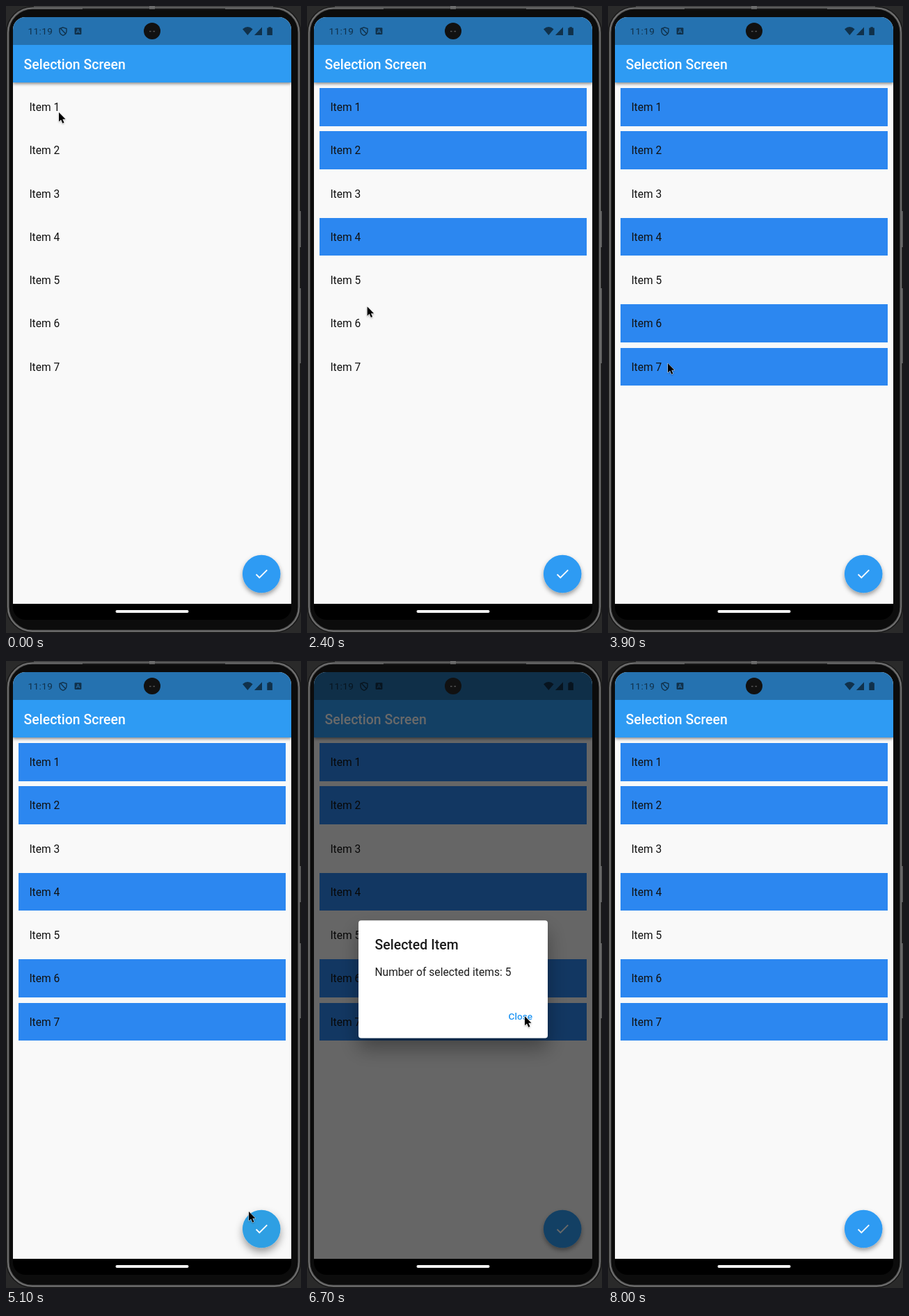
Animation, 424 px wide and 902 px high, one loop 8.1 s. Source, as an HTML page:

```html
<!DOCTYPE html>
<html lang="en">
<head>
<meta charset="utf-8">
<title>Selection Screen</title>
<style>
  html, body { margin: 0; width: 100%; height: 100%; overflow: hidden; background: #202020; }
  svg { display: block; width: 424px; height: 902px; font-family: Roboto, "Noto Sans", sans-serif; }
  .title { font-size: 19.46px; font-weight: 500; }
  .body { font-size: 15.57px; }
</style>
</head>
<body>
<svg viewBox="0 0 424 902" xmlns="http://www.w3.org/2000/svg">
  <defs>
    <clipPath id="screenClip"><rect x="10" y="16" width="400" height="867" rx="18"/></clipPath>
    <filter id="barShadow" x="-5%" y="-20%" width="110%" height="160%">
      <feDropShadow dx="0" dy="2" stdDeviation="2" flood-opacity=".45"/>
    </filter>
    <filter id="fabShadow" x="-50%" y="-50%" width="200%" height="200%">
      <feDropShadow dx="0" dy="3.5" stdDeviation="3.2" flood-opacity=".38"/>
    </filter>
    <filter id="fabLift" x="-50%" y="-50%" width="200%" height="220%">
      <feDropShadow dx="0" dy="6" stdDeviation="6" flood-opacity=".38"/>
    </filter>
    <filter id="dialogShadow" x="-30%" y="-30%" width="160%" height="180%">
      <feDropShadow dx="0" dy="15" stdDeviation="14" flood-opacity=".34"/>
    </filter>
    <filter id="cursorShadow" x="-50%" y="-50%" width="200%" height="200%">
      <feDropShadow dx="0" dy="1.2" stdDeviation="1" flood-opacity=".35"/>
    </filter>
  </defs>

  <!-- phone body -->
  <rect width="424" height="902" fill="#2a2a2a"/>
  <rect x=".8" y="1.2" width="422.4" height="900" rx="37" fill="#0c0c0c" stroke="#161616" stroke-width="1.4"/>
  <rect x="3" y="3.2" width="418" height="896" rx="35" fill="none" stroke="#505050" stroke-width="3.2"/>
  <rect x="2.8" y="3" width="418.4" height="896.4" rx="35" fill="none" stroke="#7c7c7c" stroke-width="1.1"/>
  <path d="M40 1H384" stroke="#6a6a6a" stroke-width="1.2"/>
  <path d="M110 4.4H206M214 4.4H315" stroke="#161616" stroke-width="2"/>
  <rect x="206" y="0" width="8" height="4" fill="#6c6c6c"/>
  <path d="M423 295V347M423 406V514" stroke="#6a6a6a" stroke-width="1.6"/>

  <g clip-path="url(#screenClip)">
    <rect x="10" y="16" width="400" height="844" fill="#f9f9f9"/>
    <g id="tiles"></g>
    <rect x="10" y="56" width="400" height="54" fill="#2f9bf3" filter="url(#barShadow)"/>
    <rect x="10" y="16" width="400" height="40" fill="#2572b0"/>
    <text class="title" x="25.6" y="90.6" fill="#fff">Selection Screen</text>

    <!-- status icons -->
    <g fill="#10314b">
      <text x="31.6" y="41.2" font-size="13.6" letter-spacing=".35">11:19</text>
      <path d="M82 30.8L87 32.6V36C87 39 85 41.3 82 42.3C79 41.3 77 39 77 36V32.6ZM78.8 32.8L86 40.3" fill="none" stroke="#10314b" stroke-width="1.4"/>
      <rect x="98.6" y="31.2" width="9.8" height="9.8" rx="1"/>
      <path d="M101 39L103.5 33L106 39M102 37.2H105" fill="none" stroke="#2572b0"/>
      <path d="M340 33.2Q347.3 27 354.6 33.2L347.3 42Z"/>
      <path d="M368 30.5V42H357Z" opacity=".35"/>
      <path d="M364.5 34.2V42H357Z M368 30.5V42H357Z"/>
      <path d="M375.3 31.6H377.3V30.2H380.9V31.6H382.9V42H375.3Z"/>
    </g>

    <g id="fab">
      <circle id="fabDisc" cx="367.2" cy="817" r="27.3"/>
      <path transform="translate(355.5 805.3) scale(.973)" fill="#fff" d="M9 16.17L4.83 12l-1.42 1.41L9 19 21 7l-1.41-1.41z"/>
    </g>

    <rect id="scrim" x="10" y="16" width="400" height="844"/>
    <rect x="10" y="860" width="400" height="23" fill="#000"/>
    <rect x="157.5" y="869" width="105" height="4" rx="2" fill="#f4f4f4"/>

    <g id="dialog">
      <rect x="74" y="373.3" width="272" height="169.2" rx="4" fill="#fff" filter="url(#dialogShadow)"/>
      <rect id="closeInk" x="281.5" y="493.5" width="56.5" height="36" rx="10" fill="#3fb4ee"/>
      <g fill="#1c1c1c">
        <text class="title" x="97.4" y="415.2" letter-spacing=".04">Selected Item</text>
        <text class="body" x="97.4" y="453.4" letter-spacing=".03">Number of selected items: 5</text>
      </g>
      <text x="289.6" y="516.2" font-size="13.62" font-weight="500" fill="#2196f3">Close</text>
    </g>
  </g>

  <circle cx="210" cy="36" r="12" fill="#111"/>
  <path d="M206 36.5h2.6M211.4 36.5h2.6" stroke="#555" stroke-width="1.3"/>

  <g id="cursor">
    <path transform="translate(0 1) scale(.9)" d="M0 0V14.8L3.4 11.6L5.9 17.4L8.3 16.3L5.9 10.8H10.6Z" fill="#000" stroke="#fff" paint-order="stroke" stroke-linejoin="round" filter="url(#cursorShadow)"/>
  </g>
</svg>

<script>
const LOOP = 8100, STEP = 100;
const TILE = { x: 18, top: 118, width: 384, height: 54.7, pitch: 62.25 };
const $ = id => document.getElementById(id);

// Press time of each item that gets selected, and where it is touched.
const taps = {
  1: { at: 300, x: 76 }, 2: { at: 1300, x: 83 }, 4: { at: 1900, x: 90 },
  6: { at: 2600, x: 86 }, 7: { at: 3400, x: 86 }
};

// Pointer stops: time, x, y.
const pointer = [
  [0, 76, 152], [600, 76, 152], [1000, 83, 213], [1400, 83, 213],
  [1600, 90, 331], [2100, 90, 331], [2500, 86, 450], [3000, 86, 450],
  [3300, 86, 513], [3900, 86, 513], [4800, 349, 791], [5600, 349, 791],
  [6500, 313, 510], [LOOP, 313, 510]
];

const clamp = v => Math.max(0, Math.min(1, v));
const progress = (t, from, to) => clamp((t - from) / (to - from));
const smooth = u => u * u * (3 - 2 * u);

function add(parent, name, attrs) {
  const el = document.createElementNS("http://www.w3.org/2000/svg", name);
  for (const key in attrs) el.setAttribute(key, attrs[key]);
  return parent.appendChild(el);
}

const tiles = Array.from({ length: 7 }, (_, i) => {
  const top = TILE.top + i * TILE.pitch;
  const y = Math.round(top);
  const box = { x: TILE.x, y, width: TILE.width, height: Math.round(top + TILE.height) - y };
  const id = "tileClip" + i;
  add(add($("tiles"), "clipPath", { id }), "rect", box);
  const fill = add($("tiles"), "rect", { ...box, fill: "#2c87f0" });
  const tap = taps[i + 1];
  const clipped = add($("tiles"), "g", { "clip-path": `url(#${id})` });
  const splash = add(clipped, "circle", { cx: tap ? tap.x : 0, cy: y + 30 });
  add($("tiles"), "text", { class: "body", x: 33.4, y: top + 33.1, fill: "#111" }).textContent = `Item ${i + 1}`;
  return { tap, fill, splash };
});

function drawTile({ tap, fill, splash }, t) {
  const age = tap ? t - tap.at : -1;
  const selected = age >= 100;
  fill.setAttribute("opacity", selected ? 1 : 0);
  splash.setAttribute("r", Math.max(0, 31 + age * 0.43));
  splash.setAttribute("fill", selected ? "#30a0dc" : "#888");
  splash.setAttribute("opacity", age < 0 ? 0 : (selected ? 0.45 : 0.2) * (1 - progress(age, 300, 500)));
}

function pointerAt(t) {
  const i = pointer.findIndex(p => p[0] > t);
  const [t0, x0, y0] = pointer[i - 1], [t1, x1, y1] = pointer[i];
  const u = smooth(progress(t, t0, t1));
  return [x0 + (x1 - x0) * u, y0 + (y1 - y0) * u];
}

function render(t) {
  tiles.forEach(tile => drawTile(tile, t));

  const pressed = t >= 5000 && t < 5300;
  $("fabDisc").setAttribute("fill", pressed ? "#2f9fe3" : "#2f9bf3");
  $("fab").setAttribute("filter", `url(#${pressed ? "fabLift" : "fabShadow"})`);

  const closing = 0.08 * progress(t, 7400, 7500) + 0.92 * progress(t, 7500, 7700);
  const open = smooth(progress(t, 5100, 5400)) * (1 - closing);
  $("scrim").setAttribute("opacity", 0.59 * open);
  $("dialog").setAttribute("opacity", open * open);
  $("closeInk").setAttribute("opacity", 0.3 * progress(t, 7100, 7400));

  const [x, y] = pointerAt(t);
  $("cursor").setAttribute("transform", `translate(${x} ${y})`);
  $("cursor").setAttribute("opacity", t < 7900 ? 1 : 0);
}

const start = performance.now();
function tick() {
  const t = (performance.now() - start) % LOOP;
  render(Math.floor(t / STEP) * STEP);
  requestAnimationFrame(tick);
}
render(0);
requestAnimationFrame(tick);
</script>
</body>
</html>
```
